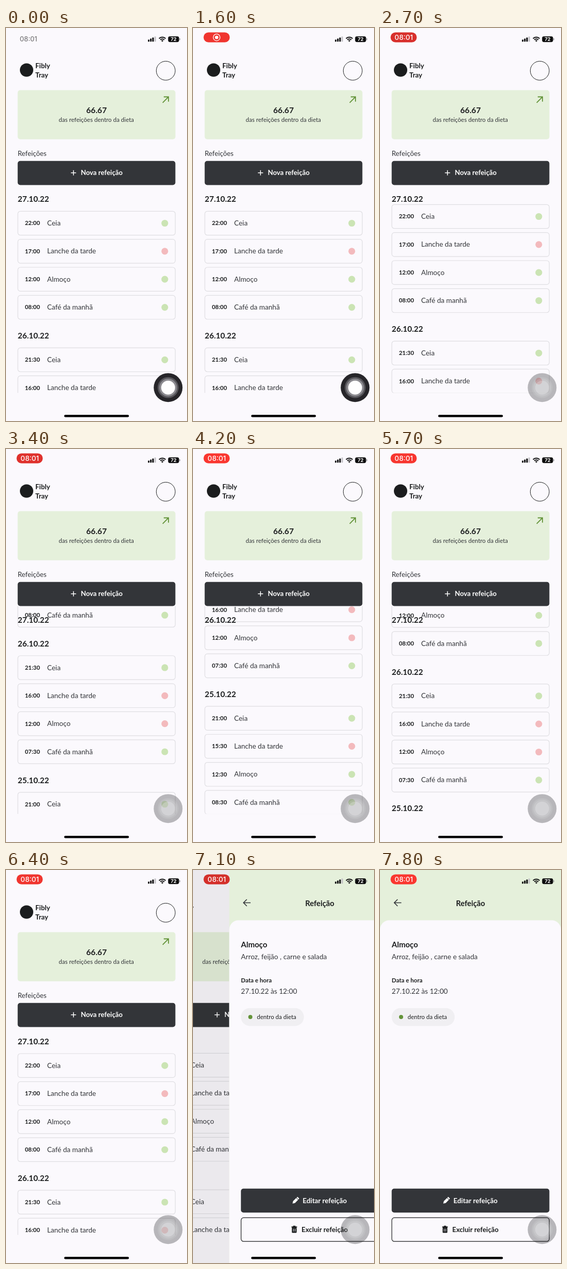
Recreate the animation shown at these times as an HTML page with a canvas. Size 352 by 762 pixels, loop 8 s.

```html
<!DOCTYPE html>
<html lang="pt-BR">
<head>
<meta charset="utf-8">
<title>Refeições</title>
<style>
html, body { margin: 0; width: 100%; height: 100%; overflow: hidden; background: #fbf9fd; }
canvas { display: block; width: 352px; height: 762px; }
</style>
</head>
<body>
<canvas id="stage"></canvas>
<script>
const W = 352, H = 762, LOOP = 8000;
const INK = '#1b1d1e', DARK = '#333539', PAGE = '#fbf9fd', LINE = '#dfdee2';
const MINT = '#e5f0db', LEAF = '#639339', GREEN = '#cbe4b4', RED = '#f3babd';
const LIST_TOP = 304.5, LIST_END = 707.5, SECTION = 264.8, ROW = 54.35;
const UI = 'Lato, "Open Sans", sans-serif', SYSTEM = 'Inter, "Liberation Sans", sans-serif';

const canvas = document.getElementById('stage');
const ctx = canvas.getContext('2d');
const dpr = window.devicePixelRatio || 1;
canvas.width = W * dpr;
canvas.height = H * dpr;

const meals = ['Ceia', 'Lanche da tarde', 'Almoço', 'Café da manhã'];
const days = [
  { date: '27.10.22', times: ['22:00', '17:00', '12:00', '08:00'], diet: [1, 0, 1, 1] },
  { date: '26.10.22', times: ['21:30', '16:00', '12:00', '07:30'], diet: [1, 0, 0, 1] },
  { date: '25.10.22', times: ['21:00', '15:30', '12:30', '08:30'], diet: [1, 0, 1, 1] }
];

// [ms, scroll offset]
const scrollKeys = [
  [2500, 0], [2900, 42], [3400, 219], [3800, 342], [4200, 386], [4700, 390.5],
  [5100, 390.5], [5350, 360], [5700, 165], [6000, 40], [6400, -0.7], [6650, 0]
];

const clamp = v => Math.min(1, Math.max(0, v));
const mix = (a, b, p) => a + (b - a) * p;
const ramp = (t, from, to) => clamp((t - from) / (to - from));
const smooth = p => p * p * (3 - 2 * p);

function slope(i) {
  const k = scrollKeys;
  if (i === 0 || i === k.length - 1) return 0;
  const a = (k[i][1] - k[i - 1][1]) / (k[i][0] - k[i - 1][0]);
  const b = (k[i + 1][1] - k[i][1]) / (k[i + 1][0] - k[i][0]);
  return a * b <= 0 ? 0 : 2 * a * b / (a + b);
}

function scrollAt(t) {
  const k = scrollKeys;
  if (t <= k[0][0]) return k[0][1];
  const i = k.findIndex((key, n) => n && t < key[0]) - 1;
  if (i < 0) return 0;
  const d = k[i + 1][0] - k[i][0], u = (t - k[i][0]) / d;
  return mix(k[i][1], k[i + 1][1], smooth(u)) +
    d * u * (1 - u) * ((1 - u) * slope(i) - u * slope(i + 1));
}

// Opacity of a row while it is touched
function pressed(t, down, up) {
  return 1 - 0.8 * smooth(ramp(t, down, down + 150)) * (1 - smooth(ramp(t, up, up + 250)));
}

function faded(alpha, draw) {
  if (alpha <= 0) return;
  ctx.save();
  ctx.globalAlpha *= alpha;
  draw();
  ctx.restore();
}

// y is the middle of the capitals
function text(str, x, y, size, { weight = 400, color = INK, align = 'left', font = UI } = {}) {
  ctx.font = `${weight} ${size}px ${font}`;
  ctx.fillStyle = color;
  ctx.textAlign = align;
  ctx.fillText(str, x, y + size * 0.34);
}

function box(x, y, w, h, r, fill, stroke, width = 1.2) {
  ctx.beginPath();
  ctx.roundRect(x, y, w, h, r);
  if (fill) { ctx.fillStyle = fill; ctx.fill(); }
  if (stroke) { ctx.strokeStyle = stroke; ctx.lineWidth = width; ctx.stroke(); }
}

function disc(x, y, r, fill) {
  ctx.beginPath();
  ctx.arc(x, y, r, 0, Math.PI * 2);
  ctx.fillStyle = fill;
  ctx.fill();
}

function ring(x, y, r, color, width) {
  ctx.beginPath();
  ctx.arc(x, y, r, 0, Math.PI * 2);
  ctx.strokeStyle = color;
  ctx.lineWidth = width;
  ctx.stroke();
}

function strokePath(d, color, width) {
  ctx.strokeStyle = color;
  ctx.lineWidth = width;
  ctx.stroke(new Path2D(d));
}

function drawRow(day, n, y) {
  box(23, y - 23.2, 306.2, 46.4, 5, null, LINE);
  text(day.times[n], 36.7, y, 11.4, { weight: 700 });
  text(meals[n], 80, y, 13.6, { color: DARK });
  disc(308.8, y, 6.6, day.diet[n] ? GREEN : RED);
}

function drawList(t) {
  const offset = scrollAt(t);
  ctx.save();
  ctx.beginPath();
  ctx.rect(0, LIST_TOP, W, LIST_END - LIST_TOP);
  ctx.clip();
  days.forEach((day, s) => {
    const head = 332 + s * SECTION - offset;
    day.times.forEach((_, n) => {
      const y = head + 46.5 + n * ROW;
      if (y < LIST_TOP - 30 || y > LIST_END + 30) return;
      let alpha = 1;
      if (s === 1 && n === 3) alpha = pressed(t, 4940, 5120);
      if (s === 0 && n === 2) alpha = pressed(t, 6680, 6880);
      faded(alpha, () => drawRow(day, n, y));
    });
  });
  // Sticky dates, each pushed away by the next
  days.forEach((day, s) => {
    const head = 332 + s * SECTION - offset;
    const y = Math.min(Math.max(head, 331.7), head + SECTION - 40);
    text(day.date, 22.8, y, 15.4, { weight: 700 });
  });
  ctx.restore();
}

function drawHome(t) {
  ctx.fillStyle = PAGE;
  ctx.fillRect(0, 0, W, H);
  disc(40, 81.5, 13, INK);
  text('Fibly', 57, 73, 13.3, { weight: 700 });
  text('Tray', 57, 91, 13.3, { weight: 700 });
  ring(310.7, 82.8, 18.4, INK, 1);

  box(22.7, 120.5, 306.8, 95.2, 5, MINT);
  text('66.67', 176, 159.8, 15.6, { weight: 700, align: 'center' });
  text('das refeições dentro da dieta', 175.7, 178.5, 11.6, { color: DARK, align: 'center' });
  strokePath('M304.7 144.8L316 133.5M306.8 133.5H316V142.7', LEAF, 1.8);

  text('Refeições', 22.7, 243.7, 13.3, { color: DARK });
  drawList(t);
  box(22.7, 257.8, 306.7, 46.6, 5, DARK);
  strokePath('M126.3 280.8H136.3M131.3 275.8V285.8', '#fff', 1.5);
  text('Nova refeição', 145.5, 280.7, 13.2, { weight: 700, color: '#fff' });
}

function drawPencil() {
  ctx.save();
  ctx.translate(128.8, 641);
  ctx.rotate(Math.PI / 4);
  ctx.fillStyle = '#fff';
  ctx.fill(new Path2D('M-2.6 -4.6H2.6V4L0 8.2L-2.6 4Z'));
  box(-2.6, -8, 5.2, 2.6, 1, '#fff');
  ctx.restore();
}

function drawTrash() {
  box(120.8, 691.3, 11.2, 1.6, 0.6, INK);
  box(123.8, 689.8, 5.2, 2, 0.8, INK);
  box(121.8, 692.6, 9.2, 11, 1.4, INK);
  strokePath('M124.8 695.5V701M128 695.5V701', PAGE, 1);
}

function drawDetail() {
  ctx.fillStyle = MINT;
  ctx.fillRect(0, 0, W, H);
  box(0, 97.5, W, H, [18, 18, 0, 0], PAGE);
  strokePath('M41.5 63.5H27.8M34.2 57L27.7 63.5L34.2 70', DARK, 1.7);
  text('Refeição', 176, 64.5, 14.8, { weight: 700, align: 'center' });

  text('Almoço', 22.8, 144.7, 15, { weight: 700 });
  text('Arroz, feijão , carne e salada', 22.8, 168.7, 13.7, { color: DARK });
  text('Data e hora', 22.8, 213.8, 11.6, { weight: 700 });
  text('27.10.22 às 12:00', 22.8, 235.3, 13.7, { color: DARK });
  box(22.7, 267.8, 122.5, 34.6, 17.3, '#f0eff2');
  disc(41, 285, 4, LEAF);
  text('dentro da dieta', 53.7, 285, 11.5);

  box(22.7, 617.7, 306.7, 46.6, 5, DARK);
  drawPencil();
  text('Editar refeição', 142.8, 641, 13.3, { weight: 700, color: '#fff' });
  box(23, 674.2, 306.2, 46, 5, null, INK);
  drawTrash();
  text('Excluir refeição', 140.6, 697.2, 13.2, { weight: 700 });
}

function drawClock(t) {
  faded(0.55 * (1 - ramp(t, 0, 350)), () =>
    text('08:01', 43.7, 21.8, 12.9, { weight: 500, align: 'center', font: SYSTEM, color: '#111' }));

  // The badge dims and brightens every two seconds
  const glow = smooth(0.5 + 0.5 * Math.cos(t * Math.PI / 1000));
  const color = `rgb(${mix(212, 251, glow)}, ${mix(47, 55, glow)}, ${mix(43, 48, glow)})`;
  const show = smooth(ramp(t, 60, 500)), swap = smooth(ramp(t, 2150, 2550));
  faded(show, () => {
    const w = mix(34, 51, show);
    box(46 - w / 2, 8.5, w, 19.2, 9.6, color);
    faded(1 - swap, () => {
      ring(46, 18.2, 6.6, '#fff', 1.3);
      disc(46, 18.2, 3.3, '#fff');
    });
    faded(swap, () =>
      text('08:01', 46.3, 18.3, 13.6, { weight: 500, align: 'center', font: SYSTEM, color: '#fff' }));
  });
}

function drawStatus(t) {
  drawClock(t);
  for (let i = 0; i < 4; i++) {
    const h = 4 + i * 2;
    box(276 + i * 4.2, 26.5 - h, 3, h, 0.8, i < 3 ? '#0b0b0c' : '#c3c2c6');
  }
  const a = Math.PI / 4;
  ctx.strokeStyle = '#0b0b0c';
  ctx.lineWidth = 2;
  for (const r of [5.6, 9]) {
    ctx.beginPath();
    ctx.arc(304, 26.8, r, -Math.PI / 2 - a, -Math.PI / 2 + a);
    ctx.stroke();
  }
  ctx.beginPath();
  ctx.moveTo(304, 26.8);
  ctx.arc(304, 26.8, 3.2, -Math.PI / 2 - a, -Math.PI / 2 + a);
  ctx.fillStyle = '#0b0b0c';
  ctx.fill();
  box(315.3, 16.2, 21.2, 11, 3.4, '#0b0b0c');
  box(337.3, 19.8, 1.4, 4, 0.7, '#8d8c90');
  text('72', 325.9, 21.8, 9.4, { weight: 700, align: 'center', font: SYSTEM, color: '#fff' });
}

function drawTouchButton(t) {
  const rest = smooth(ramp(t, 2200, 2700));
  const layers = [
    [28, '#262529', 'rgba(20,18,22,.29)'],
    [20.4, '#57565b', 'rgba(255,255,255,.1)'],
    [17.2, '#8b8a8f', 'rgba(255,255,255,.12)'],
    [13.5, '#fefefe', 'rgba(255,255,255,.24)']
  ];
  const stack = n => layers.forEach(l => disc(315.3, 697.2, l[0], l[n]));
  faded(rest, () => stack(2));
  faded(1 - rest, () => stack(1));
}

function render(t) {
  ctx.setTransform(dpr, 0, 0, dpr, 0, 0);
  const push = 1 - Math.pow(1 - ramp(t, 6880, 7480), 3.5);
  if (push < 1) {
    ctx.save();
    ctx.translate(-0.3 * W * push, 0);
    drawHome(t);
    ctx.restore();
  }
  if (push > 0) {
    ctx.fillStyle = `rgba(0,0,0,${0.08 * push})`;
    ctx.fillRect(0, 0, W, H);
    ctx.save();
    ctx.translate(W * (1 - push), 0);
    drawDetail();
    ctx.restore();
  }
  drawStatus(t);
  drawTouchButton(t);
  box(113.2, 750, 125.8, 4.4, 2.2, '#000');
}

const start = performance.now();
function tick() {
  render((performance.now() - start) % LOOP);
  requestAnimationFrame(tick);
}
tick();
</script>
</body>
</html>
```
